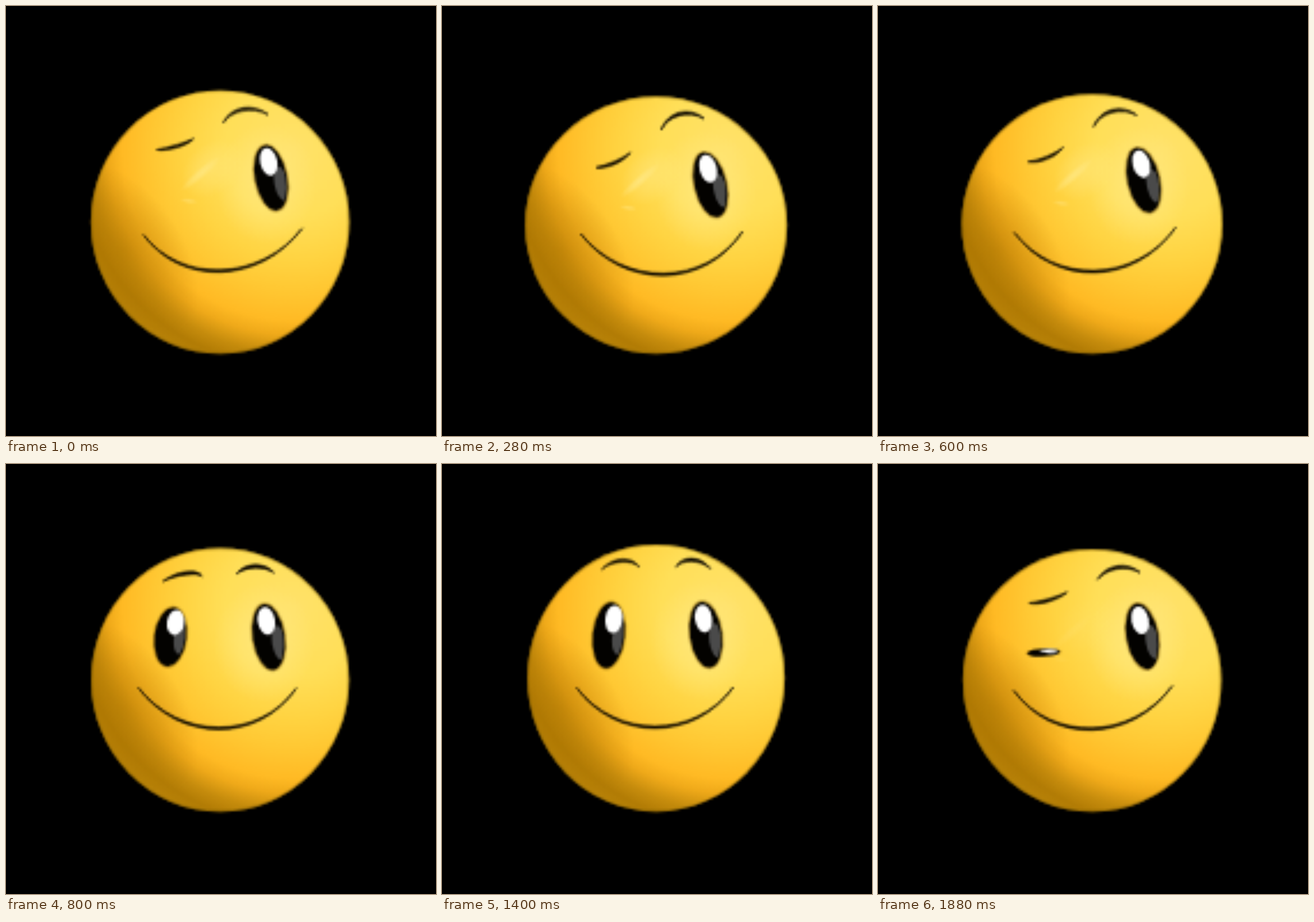
Write an HTML page with a canvas that moves like this. It is 748x748 px and loops after 1920 ms.

```html
<!DOCTYPE html>
<html lang="en">
<head>
<meta charset="utf-8">
<title>Winking ball</title>
<style>
html, body { margin: 0; width: 100%; height: 100%; overflow: hidden; background: #000; }
canvas { display: block; width: 748px; height: 748px; }
</style>
</head>
<body>
<canvas id="stage" width="187" height="187"></canvas>
<script>
const LOOP = 1920, STEP = 40, TAU = Math.PI * 2;
const ctx = document.getElementById('stage').getContext('2d');

// ball: half width, top. Lines: start, middle, end. right: x, y, tilt. left: x, y, height. crease: strength.
const turning = {
  ball: [225, 146.5],
  browL: [262, 250, 297, 244, 326, 231], browR: [378, 203, 412, 180, 456, 189],
  mouth: [239, 398, 375, 461, 515, 387],
  right: [461, 299, -11], left: [288, 335, 0], crease: [0.8]
};
const wink = {
  ball: [228, 157],
  browL: [268, 281, 300, 273, 328, 255], browR: [381, 216, 413, 188, 456, 196],
  mouth: [241, 396, 386, 467, 523, 392],
  right: [467, 311, -13], left: [288, 335, 0], crease: [0.85]
};
const release = {
  ball: [227, 153],
  browL: [261, 271, 294, 264, 322, 246], browR: [375, 210, 407, 183, 450, 190],
  mouth: [237, 394, 378, 462, 518, 385],
  right: [462, 303, -12.5], left: [288, 335, 0], crease: [0.8]
};
const opening = {
  ball: [224.5, 146],
  browL: [273, 204, 313, 190, 341, 195], browR: [401, 191, 433, 178, 466, 189],
  mouth: [230, 389, 370, 460, 505, 390],
  right: [457, 301, -8.5], left: [286, 301, 104], crease: [0]
};
const rest = {
  ball: [224, 139.5],
  browL: [278, 183, 313, 168, 343, 179], browR: [407, 179, 435, 167, 467, 182],
  mouth: [234, 389, 371, 458, 507, 388],
  right: [459, 297, -7.5], left: [290, 298, 116], crease: [0]
};
const closing = {
  ball: [225, 147.5],
  browL: [263, 242, 297, 237, 329, 223], browR: [382, 201, 416, 180, 456, 189],
  mouth: [236, 394, 373, 461, 512, 386],
  right: [460, 300, -10], left: [288, 328, 14], crease: [0.2]
};

const keys = [
  [0, turning], [200, wink], [520, wink], [600, release],
  [800, opening], [960, rest], [1680, rest], [1880, closing]
];

function keyAt(i) {
  const n = keys.length, turn = Math.floor(i / n);
  const [time, pose] = keys[i - turn * n];
  return { time: time + turn * LOOP, pose };
}

// Cyclic monotone cubic through the keys: flat holds, no overshoot.
function sample(part, index, i, time) {
  const pts = [-1, 0, 1, 2].map(d => {
    const k = keyAt(i + d);
    return [k.time, k.pose[part][index]];
  });
  const rate = j => (pts[j + 1][1] - pts[j][1]) / (pts[j + 1][0] - pts[j][0]);
  const slope = (a, b) => a * b <= 0 ? 0 : 2 * a * b / (a + b);
  const m0 = slope(rate(0), rate(1)), m1 = slope(rate(1), rate(2));
  const span = pts[2][0] - pts[1][0], u = (time - pts[1][0]) / span;
  const s = u * u * (3 - 2 * u);
  return pts[1][1] * (1 - s) + pts[2][1] * s
    + span * (m0 * u * (1 - u) * (1 - u) - m1 * u * u * (1 - u));
}

function poseAt(time) {
  let i = keys.length - 1;
  while (keys[i][0] > time) i--;
  const pose = {};
  for (const part in rest) pose[part] = rest[part].map((_, n) => sample(part, n, i, time));
  return pose;
}

function oval(x, y, rx, ry, degrees = 0) {
  ctx.beginPath();
  ctx.ellipse(x, y, rx, ry, degrees * Math.PI / 180, 0, TAU);
}

function radial(x, y, r, stops) {
  const g = ctx.createRadialGradient(x, y, 0, x, y, r);
  for (const [at, color] of stops) g.addColorStop(at / r, color);
  return g;
}

// Soft oval patch that fades out to its edge.
function softOval(x, y, rx, ry, degrees, rgb, alpha) {
  ctx.save();
  ctx.translate(x, y);
  ctx.rotate(degrees * Math.PI / 180);
  ctx.scale(rx, ry);
  oval(0, 0, 1, 1);
  ctx.fillStyle = radial(0, 0, 1, [
    [0, `rgba(${rgb},${alpha})`], [0.5, `rgba(${rgb},${alpha * 0.6})`], [1, `rgba(${rgb},0)`]
  ]);
  ctx.fill();
  ctx.restore();
}

function drawBall([halfWidth, top]) {
  const bottom = 605, x = 372.5, y = (top + bottom) / 2;
  const outline = () => oval(x, y, halfWidth, (bottom - top) / 2);
  outline();
  ctx.fillStyle = radial(500, 250, 440, [
    [0, '#ffe26a'], [120, '#ffdf58'], [190, '#ffd442'], [240, '#ffc934'],
    [298, '#ffba24'], [322, '#f0aa1a'], [354, '#c68c0d'], [378, '#b27c05'],
    [400, '#b88208'], [440, '#c89008']
  ]);
  ctx.fill();
  ctx.save();
  ctx.clip();
  softOval(205, 425, 100, 175, -35, '172,116,0', 0.5);
  outline();
  ctx.strokeStyle = 'rgba(130,95,0,.5)';
  ctx.lineWidth = 6;
  ctx.stroke();
  ctx.restore();
}

function drawEye(x, y, height, tilt, shineX, greyX, greyY) {
  if (height < 4) return;
  ctx.save();
  ctx.translate(x, y);
  ctx.scale(1, height / 116);
  oval(0, 0, 27.5, 57.5, tilt);
  ctx.strokeStyle = 'rgba(120,80,0,.5)';
  ctx.lineWidth = 6;
  ctx.stroke();
  ctx.fillStyle = '#030200';
  ctx.fill();
  ctx.save();
  oval(0, 0, 25, 54, tilt);
  ctx.clip();
  oval(greyX, greyY, 12, 30, tilt);
  ctx.fillStyle = '#4a4a4a';
  ctx.fill();
  ctx.restore();
  oval(shineX, -28, 15, 24.5, tilt * 1.2);
  ctx.fillStyle = '#fff';
  ctx.fill();
  ctx.restore();
}

// Rounded arc through three points, thickest in the middle.
function drawLine([ax, ay, mx, my, bx, by], width) {
  const dx = (mx - (ax + bx) / 2) * 4 / 3, dy = (my - (ay + by) / 2) * 4 / 3;
  const control = (u, shift) => [ax + (bx - ax) * u + dx, ay + (by - ay) * u + dy + shift];
  ctx.beginPath();
  ctx.moveTo(ax, ay);
  ctx.bezierCurveTo(...control(0.25, -width), ...control(0.75, -width), bx, by);
  ctx.bezierCurveTo(...control(0.75, width), ...control(0.25, width), ax, ay);
  ctx.fillStyle = ctx.strokeStyle = '#0a0600';
  ctx.lineWidth = 2.2;
  ctx.lineJoin = 'round';
  ctx.fill();
  ctx.stroke();
}

function drawCrease(x, y, strength) {
  if (strength < 0.01) return;
  ctx.save();
  ctx.globalAlpha = strength;
  ctx.translate(x, y);
  softOval(-102, -16, 60, 44, -40, '255,232,130', 0.6);
  softOval(-122, -8, 46, 9, -41, '255,234,140', 0.8);
  softOval(-143, 40, 16, 5, 8, '255,228,125', 0.7);
  ctx.restore();
}

function draw(time) {
  const p = poseAt(time);
  const [rx, ry, tilt] = p.right, [lx, ly, height] = p.left;
  ctx.setTransform(0.25, 0, 0, 0.25, 0, 0);
  ctx.fillStyle = '#000';
  ctx.fillRect(0, 0, 748, 748);
  drawBall(p.ball);
  softOval(rx - 8, ry + 10, 88, 104, 0, '255,236,140', 0.6);
  drawCrease(rx, ry, p.crease[0]);
  drawEye(lx, ly, height, 6, 9, 18, 4);
  drawEye(rx, ry, 116, tilt, -4, 18, 10);
  drawLine(p.browL, 3.2);
  drawLine(p.browR, 3.4);
  drawLine(p.mouth, 2.4);
}

function tick() {
  const time = performance.now() % LOOP;
  draw(Math.floor(time / STEP) * STEP);
  requestAnimationFrame(tick);
}
tick();
</script>
</body>
</html>
```
